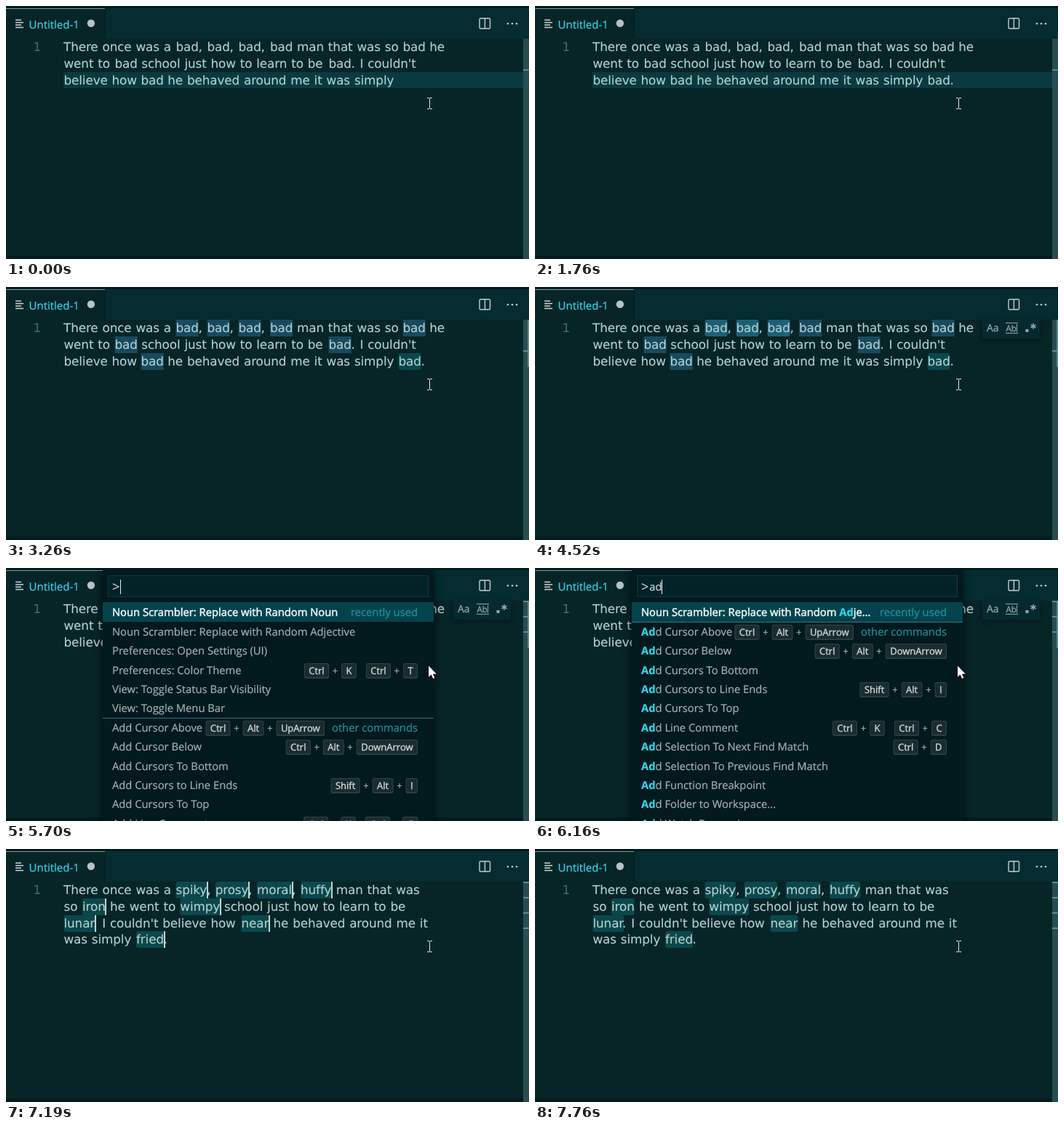
An HTML page with a canvas that plays this animation: 719 by 348 pixels, repeating every 8 s.

```html
<!DOCTYPE html>
<html lang="en">
<head>
<meta charset="utf-8">
<title>Editor</title>
<style>
html, body { margin: 0; width: 100%; height: 100%; overflow: hidden; background: #072427; }
canvas { display: block; }
</style>
</head>
<body>
<canvas id="stage" width="719" height="348"></canvas>
<script>
const ctx = document.getElementById('stage').getContext('2d');
const LOOP = 8000, ROW = 26.4, LIST_TOP = 47.4, LINE = 23;
const CODE = '16.8px "DejaVu Sans", sans-serif';
const UI = '14.75px "Open Sans", sans-serif';
const KEY = '13px "Open Sans", sans-serif';
const BG = '#072427', DARK = '#02191d', TEXT = '#b4d3d4', CYAN = '#2fd6ea';

// Each line is a list of [x, text]; a leading * marks a replaceable word.
const BEFORE = [
  [[79, 'There once was a'], [233.5, '*bad'], [264.6, ','], [276.5, '*bad'], [307.6, ','],
   [319.5, '*bad'], [350.6, ','], [363, '*bad'], [400, 'man that was so'], [545.5, '*bad'], [582.3, 'he']],
  [[79.5, 'went to'], [149.5, '*bad'], [186.3, 'school just how to learn to be'],
   [443.5, '*bad'], [474.6, '.'], [486.5, "I couldn't"]],
  [[79.5, 'believe how'], [185.5, '*bad'], [222.3, 'he behaved around me it was simply'], [539.5, '*bad'], [570.6, '.']]
];
const AFTER = [
  [[79, 'There once was a'], [233.5, '*spiky'], [276.3, ','], [287.7, '*prosy'], [333, ','],
   [345, '*moral'], [393, ','], [405, '*huffy'], [453.7, 'man that was']],
  [[79.5, 'so'], [105, '*iron'], [143, 'he went to'], [239.3, '*wimpy'], [300, 'school just how to learn to be']],
  [[79.5, '*lunar'], [120, '.'], [132.2, "I couldn't believe how"], [323.5, '*near'], [367.5, 'he behaved around me it']],
  [[79.5, 'was simply'], [179, '*fried'], [216.5, '.']]
];
// When each "bad" becomes selected, in reading order.
const SELECT_AT = [3790, 3880, 4040, 4610, 4610, 4680, 4680, 4750, 2470];
const LAST = 8;

const COMMANDS = [
  ['Noun Scrambler: Replace with Random Noun'],
  ['Noun Scrambler: Replace with Random Adjective'],
  ['Preferences: Open Settings (UI)'],
  ['Preferences: Color Theme', 'Ctrl+K Ctrl+T'],
  ['View: Toggle Status Bar Visibility'],
  ['View: Toggle Menu Bar'],
  ['Add Cursor Above', 'Ctrl+Alt+UpArrow'],
  ['Add Cursor Below', 'Ctrl+Alt+DownArrow'],
  ['Add Cursors To Bottom'],
  ['Add Cursors to Line Ends', 'Shift+Alt+I'],
  ['Add Cursors To Top'],
  ['Add Line Comment', 'Ctrl+K Ctrl+C'],
  ['Add Selection To Next Find Match', 'Ctrl+D'],
  ['Add Selection To Previous Find Match'],
  ['Add Function Breakpoint'],
  ['Add Folder to Workspace...'],
  ['Add Watch Expression']
].map(([name, keys], i) => ({ name, keys, recent: i < 6 }));

const QUERY = [[5700, ''], [6000, 'a'], [6160, 'ad'], [6235, 'adj'], [6310, 'adje'],
  [6480, 'adjec'], [6710, 'adject'], [6860, 'adjecti'], [6940, 'adjective']];

const within = (t, a, b) => t >= a && t < b;
const baseline = row => Math.round(62 + row * 22.8);

function rect(x, y, w, h, color, r = 0) {
  ctx.fillStyle = color;
  ctx.beginPath();
  ctx.roundRect(x, y, w, h, r);
  ctx.fill();
}

function path(points, color, width = 1) {
  ctx.strokeStyle = color;
  ctx.lineWidth = width;
  ctx.beginPath();
  points.forEach(([x, y], i) => i ? ctx.lineTo(x, y) : ctx.moveTo(x, y));
  ctx.stroke();
}

function setFont(font) {
  ctx.font = font;
  ctx.textRendering = 'geometricPrecision';
  ctx.letterSpacing = font === CODE ? '-0.1px' : '0px';
  ctx.wordSpacing = font === CODE ? '0.66px' : '0px';
}

function width(text, font) {
  setFont(font);
  return ctx.measureText(text).width;
}

// Draws text, thickened by an outline, and returns the x where it ends.
function put(text, x, y, color, font = UI, weight = .2) {
  setFont(font);
  ctx.fillStyle = ctx.strokeStyle = color;
  ctx.lineWidth = weight;
  ctx.fillText(text, x, y);
  ctx.strokeText(text, x, y);
  return x + ctx.measureText(text).width;
}

function shadowed(draw, color, blur, dy) {
  ctx.save();
  ctx.shadowColor = color;
  ctx.shadowBlur = blur;
  ctx.shadowOffsetY = dy;
  draw();
  ctx.restore();
}

function drawFrame() {
  rect(0, 0, 719, 348, BG);
  rect(0, 3, 719, 42, '#042c31');
  rect(0, 0, 719, 3, DARK);
  rect(0, 3, 136, 42, BG);
  rect(136, 3, 1, 42, '#031d21');
  rect(0, 3, 136, 1, '#7f9a9c');
  [8, 11, 8, 11].forEach((w, i) => rect(13, 18.5 + i * 3.4, w, 1.6, '#c2cdce'));
  put('Untitled-1', 31.5, 31, CYAN, '15px "Open Sans", sans-serif');
  rect(111.7, 18.5, 10.4, 10.4, '#b5c3c4', 5.2);
  ctx.strokeStyle = '#c3cecf';
  ctx.lineWidth = 1.4;
  ctx.beginPath();
  ctx.roundRect(651, 17, 14.5, 14, 1.5);
  ctx.stroke();
  path([[658.4, 17], [658.4, 31]], '#c3cecf', 1.4);
  [690, 696, 702].forEach(x => rect(x - 1.3, 23, 2.6, 2.6, '#c3cecf', 1.3));
  rect(0, 343.5, 719, 4.5, '#041b1f');
}

function drawRuler(t) {
  rect(711, 45, 8, 303, '#284c50');
  if (within(t, 2300, 7185)) rect(717, 45, 2, 65, '#5c8687');
  const marks = t >= 7185 ? [45, 66, 87, 108] : t >= 4750 ? [45, 66, 87] : [87];
  marks.forEach(y => rect(711, y, 8, 2, '#4f949a'));
}

function highlightWord(t, i, x, y, w) {
  const selected = t >= SELECT_AT[i];
  const blue = t >= 2550 && i !== LAST;
  const dim = within(t, 5700, 7110);
  if (t >= 7185) rect(x, y, w, LINE, '#0b474b', 3);
  else if (blue && selected) rect(x, y, w, LINE, dim ? '#11424d' : '#1d6075', 3);
  else if (blue) rect(x, y, w, LINE, t < 2790 ? '#1b536a' : '#184a5e');
  else if (selected) rect(x, y, w, LINE, dim ? '#093c3f' : '#0a474b', 3);
  else if (within(t, 2300, 2470)) rect(x, y, w, LINE, '#124a58');
}

function drawText(t) {
  const lastTop = baseline(2) - 17;
  if (t < 2470) rect(79, lastTop, 632, 22, '#083a40');
  put('1', 37.5, 62, '#34707a', CODE, .1);
  const typed = t < 455 ? '' : t < 530 ? 'b' : t < 860 ? 'ba' : 'bad';
  const multiCaret = within(t, 3790, 4520) || within(t, 4610, 5240) || within(t, 7185, 7760);
  const carets = [];
  let word = 0;
  (t < 7185 ? BEFORE : AFTER).forEach((line, row) => {
    const base = baseline(row), top = base - 17;
    for (const [x, raw] of line) {
      let text = raw.replace('*', '');
      if (raw !== text) {
        if (t < 7185 && word === LAST) text = typed;
        const w = width(text, CODE);
        highlightWord(t, word, x, top, w);
        if (multiCaret && (t >= 7185 || t >= SELECT_AT[word]))
          carets.push([t < 7185 && word === LAST ? x : x + w, top]);
        word++;
      } else if (t < 1190 && x === 570.6) continue;
      put(text, x, base, TEXT, CODE, .1);
    }
  });
  if (within(t, 380, 1190)) carets.push([539.5 + width(typed, CODE), lastTop]);
  if (within(t, 1190, 1760)) carets.push([576.5, lastTop]);
  if (within(t, 2050, 2470)) carets.push([570.3, lastTop]);
  if (within(t, 2470, 3260)) carets.push([539.5, lastTop]);
  carets.forEach(([x, y]) => rect(Math.round(x - .3), y, 2, LINE, '#c3d5d6'));
}

function drawFindOptions() {
  const ink = '#94a8ab';
  shadowed(() => rect(615, 45, 79, 26, '#042a2f'), '#0006', 7, 2);
  put('Aa', 621, 61, ink, '13.8px "Open Sans", sans-serif', .3);
  put('Ab', 647.5, 61, ink, '11.5px "Open Sans", sans-serif', .3);
  path([[662.5, 51], [662.5, 62]], ink);
  path([[647, 49.5], [664, 49.5]], ink);
  path([[647, 63.5], [664, 63.5]], ink);
  rect(674.5, 58, 4, 4, ink);
  for (let a = 0; a < 3; a++) {
    const dx = 4 * Math.sin(a * Math.PI / 3), dy = 4 * Math.cos(a * Math.PI / 3);
    path([[685 - dx, 54 - dy], [685 + dx, 54 + dy]], ink, 1.5);
  }
}

// Lays out a shortcut from right to left and returns its left edge.
function drawKeys(keys, right, mid) {
  keys.split(' ').reverse().forEach((chord, c) => {
    if (c) right -= 13;
    chord.split('+').reverse().forEach((key, k) => {
      if (k) {
        put('+', right - 12.4, mid + 5, '#a7b6b8', KEY);
        right -= 17;
      }
      const w = width(key, KEY) + 12.8;
      right -= w;
      rect(right, mid - 10, w, 21, '#304346', 3);
      rect(right + 1, mid - 9, w - 2, 18.5, '#1a2c2f', 2.5);
      put(key, right + 6.4, mid + 5, '#d3dbdb', KEY, .35);
    });
  });
  return right;
}

function drawCommand(cmd, i, label, query) {
  const top = LIST_TOP + i * ROW, base = Math.ceil(top + 18.5), first = i === 0;
  let right = 566;
  if (first) rect(133, 47, 455, 27, '#04434d');
  if (label) {
    right -= width(label, UI);
    put(label, right, base, '#1d949f');
    right -= 10;
    if (!first) rect(133, Math.round(top), 455, 1, '#2b7482');
  }
  if (cmd.keys) right = drawKeys(cmd.keys, right, base - 5) - 4;

  let name = cmd.name;
  if (146 + width(name, UI) > right) {
    while (146 + width(name + '…', UI) > right) name = name.slice(0, -1);
    name += '…';
  }
  const at = query ? name.search(new RegExp('\\b' + query.slice(0, 4), 'i')) : name.length;
  const ink = first ? '#f4f9f9' : '#a3b3b5', weight = first ? .5 : .2;
  const end = at + query.length;
  let x = put(name.slice(0, at), 146, base, ink, UI, weight);
  x = put(name.slice(at, end), x, base, CYAN, '700 ' + UI);
  put(name.slice(end), x, base, ink, UI, weight);
}

function drawPalette(query) {
  const rows = COMMANDS.filter(c => new RegExp('\\b' + query, 'i').test(c.name));
  const bottom = Math.min(360, LIST_TOP + rows.length * ROW + 4);
  shadowed(() => rect(133, 0, 455, bottom, DARK), '#000a', 11, 4);
  rect(140, 10, 441, 30, '#0b3a40');
  rect(141, 11, 439, 28, '#032227');
  put('>', 146, 32, '#d0dadb', '18px "Open Sans", sans-serif', 0.1);
  const x = put(query, 157.2, 31, '#d0dadb');
  rect(Math.round(x - .3), 16, 1, 20, '#e4ecec');
  const firstOther = rows.findIndex(c => !c.recent);
  rows.slice(0, 12).forEach((cmd, i) => {
    const label = i === 0 ? 'recently used' : i === firstOther ? 'other commands' : '';
    drawCommand(cmd, i, label, query);
  });
  return bottom;
}

function drawPointer(arrow) {
  if (arrow) {
    const tip = new Path2D('M581 134.5v15.5l3.6-3.4 2.5 5.6 2.3-1-2.5-5.5h4.9z');
    ctx.strokeStyle = '#000';
    ctx.lineWidth = 1.2;
    ctx.stroke(tip);
    ctx.fillStyle = '#fff';
    ctx.fill(tip);
    return;
  }
  const ink = '#e6e6e6';
  path([[582.5, 127], [582.5, 141]], ink);
  [126.5, 141.5].forEach(y => {
    path([[579, y], [582, y]], ink);
    path([[583, y], [586, y]], ink);
  });
}

function draw(t) {
  drawFrame();
  drawText(t);
  drawRuler(t);
  if (within(t, 3790, 7185)) drawFindOptions();
  let bottom = 0;
  if (within(t, 5700, 7110)) bottom = drawPalette(QUERY.filter(([at]) => t >= at).pop()[1]);
  drawPointer(bottom > 135);
}

const start = performance.now();
function tick() {
  draw((performance.now() - start) % LOOP);
  requestAnimationFrame(tick);
}
tick();
</script>
</body>
</html>
```
